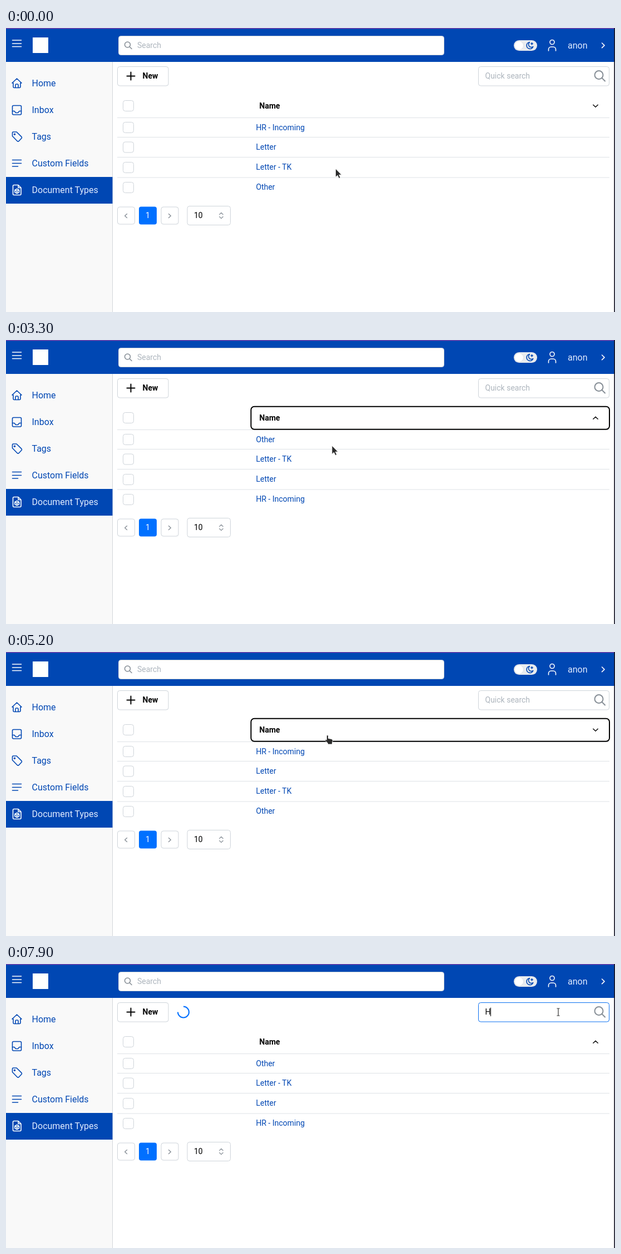
These frames come from a looping animation (1095 px wide and 511 px high, 8000 ms). An HTML page:

```html
<!DOCTYPE html>
<html lang="en">
<head>
<meta charset="utf-8">
<title>Document types</title>
<style>
  html, body { margin: 0; width: 100%; height: 100%; overflow: hidden; background: #fff; }
  svg { display: block; width: 1095px; height: 511px; }
  text { font: 14px Roboto, "Open Sans", sans-serif; white-space: pre; }
  .nav { font-size: 16px; fill: #0047b3; }
  .bold { font-weight: 700; fill: #000; }
  .link { fill: #0047b3; }
  .hint { fill: #adb5bd; }
  .box { fill: #fff; stroke: #ced4da; }
  .icon { fill: none; stroke-width: 1.6; stroke-linecap: round; stroke-linejoin: round; }
  .blue { stroke: #0047b3; }
  .white { stroke: #fff; }
  .gray { stroke: #868e96; }
  .black { stroke: #000; }
</style>
</head>
<body>
<svg viewBox="0 0 1095 511">
  <rect width="1095" height="511" fill="#fff"/>

  <!-- top bar -->
  <rect width="1095" height="61" fill="#0047b3"/>
  <rect width="1095" height="1.3" fill="#8040a8"/>
  <path class="icon white" d="M11.5 22H27.5M11.5 28H27.5M11.5 33.5H27.5"/>
  <rect x="48" y="17" width="28" height="28" fill="#fff"/>
  <rect class="box" x="202.5" y="14.5" width="585" height="34" rx="4"/>
  <g class="icon gray"><circle cx="218.500" cy="30" r="5"/><path d="M222.300 33.800L226 37.500"/></g>
  <text class="hint" x="236" y="36">Search</text>
  <rect x="913" y="22" width="42" height="19" rx="9.5" fill="#e9ecef"/>
  <circle cx="922.5" cy="31.5" r="8" fill="#fff" stroke="#dee2e6"/>
  <path class="icon blue" d="M941.500 25.500A6 6 0 1 0 947.800 33.500A5 5 0 0 1 941.500 25.500ZM945.500 26.500V30M943.800 28.200H947.300"/>
  <g class="icon white">
    <circle cx="982" cy="25.500" r="4"/>
    <path d="M975.500 41V38.500A4.500 4.500 0 0 1 980 34H984A4.500 4.500 0 0 1 988.500 38.500V41"/>
    <path d="M1071.500 27L1076 31.300L1071.500 35.600"/>
  </g>
  <text class="nav" x="1010" y="36.500" style="fill:#e0ebff">anon</text>

  <!-- side bar -->
  <rect y="61" width="191" height="450" fill="#f9f9f9"/>
  <path d="M191.5 61V511" stroke="#d3d6da"/>
  <rect y="268" width="191.500" height="48" fill="#0047b3"/>
  <g class="icon blue">
    <path d="M13 99H11L19.500 91L28 99H26M13 99V105.500A2 2 0 0 0 15 107.500H24A2 2 0 0 0 26 105.500V99M17 107.500V102.500A1.500 1.500 0 0 1 18.500 101H20.500A1.500 1.500 0 0 1 22 102.500V107.500"/>
    <rect x="11.500" y="139.500" width="16" height="16.500" rx="2"/>
    <path d="M11.500 149.500H15L17.500 152.500H21.500L24 149.500H27.500"/>
    <path d="M11.500 188.500V194.500L20.500 203.700Q21.700 204.700 22.900 203.700L28 198.300Q29 197.100 28 195.900L19 187H13Q11.500 187 11.500 188.500Z"/>
    <circle cx="15.500" cy="191.200" r="1"/>
    <path d="M11.500 237.500H27.500M11.500 243.500H27.500M11.500 249H21.500"/>
  </g>
  <g class="icon white">
    <path d="M22 282.500H14.500Q12.500 282.500 12.500 284.500V298.500Q12.500 300.500 14.500 300.500H25Q27 300.500 27 298.500V287.500L22 282.500V287.500H27"/>
    <path d="M19.700 289.500L23.500 291.500V295.500L19.700 297.500L16 295.500V291.500ZM16 291.500L19.700 293.500L23.500 291.500M19.700 293.500V297.500"/>
  </g>
  <g id="nav"></g>

  <!-- toolbar -->
  <rect class="box" x="200.500" y="69.500" width="91.500" height="34.500" rx="4"/>
  <path class="icon black" style="stroke-width:2" d="M217.500 86.500H231.500M224.500 79.500V93.500"/>
  <text class="bold" x="245.500" y="91">New</text>
  <path id="loader" class="icon" d="M-7.070 -7.070A10 10 0 1 1 -7.070 7.070" style="stroke:#0070ff;stroke-width:2;stroke-linecap:butt"/>
  <rect id="field" class="box" x="849.500" y="69.500" width="235" height="34.500" rx="4"/>
  <text id="query" x="861.500" y="91"></text>
  <path id="caret" d="M0 78.500V94" stroke="#000"/>
  <g class="icon gray" style="stroke-width:2"><circle cx="1066" cy="84.500" r="7.500"/><path d="M1071.500 90L1077 95.500"/></g>

  <!-- table -->
  <path d="M200 161.500H1085M200 196.500H1085M200 232.500H1085M200 269H1085" stroke="#dee2e6"/>
  <g id="checks"></g>
  <rect id="ring" x="440.500" y="119.700" width="644.500" height="41" rx="6" fill="#fff" stroke="#000" stroke-width="2"/>
  <text class="bold" x="455.500" y="144.500">Name</text>
  <path id="chevron" class="icon black" style="stroke-width:1.4"/>
  <g id="rows"></g>

  <!-- pages -->
  <rect class="box" x="200.500" y="322" width="31" height="31" rx="4"/>
  <rect x="239" y="321.500" width="32" height="32" rx="4" fill="#0070ff"/>
  <rect class="box" x="279" y="322" width="31" height="31" rx="4"/>
  <rect class="box" x="326" y="320.500" width="77.500" height="34" rx="4"/>
  <g class="icon gray" style="stroke-width:1.400">
    <path d="M217.500 334.500L213.700 338L217.500 341.500M292.500 334.500L296.300 338L292.500 341.500"/>
    <path d="M383.800 335.500L387 332.300L390.200 335.500M383.800 339.500L387 342.700L390.200 339.500" style="stroke-width:1.200"/>
  </g>
  <text x="255" y="342" text-anchor="middle" fill="#fff">1</text>
  <text x="338" y="342" fill="#000">10</text>

  <rect x="1093.300" width="1.700" height="511" fill="#1c1c2c"/>

  <g id="pointer">
    <path id="arrow" d="M0 0V15.500L3.600 12.200L6.100 17.600L8.800 16.400L6.300 11.200H11Z" fill="#2b2b2b" stroke="#fff" stroke-width=".9" stroke-linejoin="round"/>
    <path id="hand" d="M-1.500 .500Q0 -1.200 1.500 .500V5.500L7 6.500Q9.500 7 9.500 9.500L8.500 13.500V16H.500V14L-4 9.500Q-4.500 7.500 -2.500 7.500L-1.500 8.500Z" fill="#2b2b2b" stroke="#fff" stroke-width=".8" stroke-linejoin="round"/>
    <g id="beam" fill="none" stroke-linecap="square">
      <path d="M-2 -6.500H2M-2 6.500H2M0 -6.500V6.500" stroke="#fff" stroke-width="2.600"/>
      <path d="M-2 -6.500H2M-2 6.500H2M0 -6.500V6.500" stroke="#333" stroke-width="1.200"/>
    </g>
  </g>
</svg>
<script>
const LOOP = 8000, STEP = 100;
const $ = id => document.getElementById(id);
const show = (id, on) => $(id).setAttribute('visibility', on ? 'visible' : 'hidden');
const within = (t, from, to) => t >= from && t < to;

const NAMES = ['HR - Incoming', 'Letter', 'Letter - TK', 'Other'];
const ROW_Y = [183.5, 219, 255, 291];
const NAV = [['Home', 105], ['Inbox', 153], ['Tags', 201], ['Custom Fields', 248.5], ['Document Types', 296.5]];

// pointer path: time, x, y
const PATH = [
  [0, 592.5, 253], [300, 578, 205], [700, 558, 140], [800, 556.5, 139.5],
  [1000, 557, 140], [1200, 586.5, 203],
  [3200, 586.5, 203], [3300, 586, 190], [3600, 576, 163], [4100, 568, 149], [4200, 567.5, 147.5],
  [4300, 567.5, 147.5], [4700, 599.5, 191], [5200, 578, 150],
  [5600, 578, 150], [6000, 1049.5, 113.5], [6300, 1005, 89], [6500, 993, 86.5], [LOOP, 993, 86.5]
];

function pointerAt(t) {
  const i = PATH.findIndex(p => p[0] > t);
  const [t0, x0, y0] = PATH[i - 1], [t1, x1, y1] = PATH[i];
  const k = (t - t0) / (t1 - t0);
  return [x0 + (x1 - x0) * k, y0 + (y1 - y0) * k];
}

$('nav').innerHTML = NAV.map(([label, y], i) =>
  `<text class="nav" x="46.5" y="${y}"${i === 4 ? ' style="fill:#e0ebff"' : ''}>${label}</text>`).join('');
$('checks').innerHTML = [140, 179, 214.5, 251, 287].map(y =>
  `<rect class="box" x="210.500" y="${y - 9.5}" width="19" height="19" rx="4"/>`).join('');
$('rows').innerHTML = ROW_Y.map(y => `<text class="link" x="449.500" y="${y}"></text>`).join('');
const rows = [...$('rows').children];

function draw(t) {
  const upIcon = within(t, 900, 4400) || t >= 5700;
  const reversed = within(t, 1200, 4400) || t >= 5700;
  rows.forEach((row, i) => row.textContent = NAMES[reversed ? 3 - i : i]);
  $('chevron').setAttribute('d', upIcon ? 'M1055.800 142.300L1060 138.300L1064.200 142.300' : 'M1055.800 138.300L1060 142.300L1064.200 138.300');
  show('ring', within(t, 800, 6500));

  const loading = within(t, 900, 1200) || t >= 7700;
  const turn = (t - (t < 7700 ? 850 : 7750)) * 0.3;
  show('loader', loading);
  $('loader').setAttribute('transform', `translate(319 86.5) rotate(${turn})`);

  const typed = t >= 7700;
  $('query').textContent = typed ? 'H' : 'Quick search';
  $('query').setAttribute('class', typed ? '' : 'hint');
  $('field').style.stroke = t < 6500 ? '' : t < 6600 ? '#5a9fe8' : '#0a70f0';
  $('caret').setAttribute('transform', `translate(${typed ? 871.5 : 862.5} 0)`);
  show('caret', within(t, 6500, 7100) || typed);

  const [x, y] = pointerAt(t);
  const onHeader = y > 119 && y < 161;
  const onField = y < 104 && x > 849 && x < 1055;
  $('pointer').setAttribute('transform', `translate(${x} ${y})`);
  show('hand', onHeader);
  show('beam', onField);
  show('arrow', !onHeader && !onField);
}

let start = null;
function tick(now) {
  start ??= now;
  const t = (now - start) % LOOP;
  draw(Math.floor(t / STEP) * STEP);
  requestAnimationFrame(tick);
}
draw(0);
requestAnimationFrame(tick);
</script>
</body>
</html>
```
